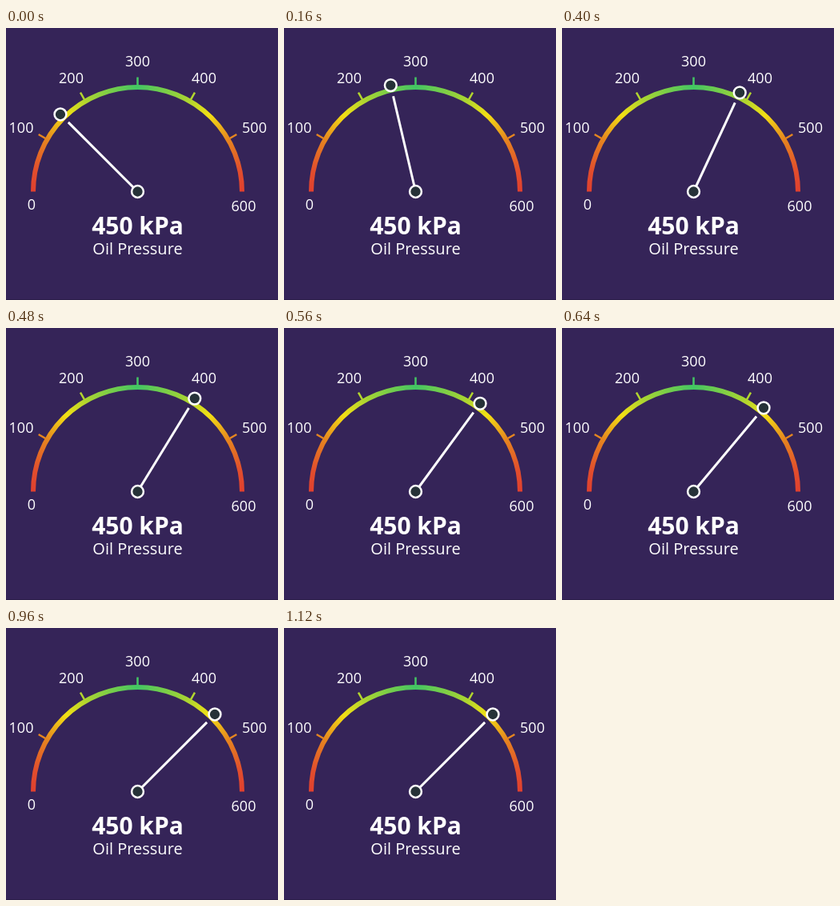
Recreate the animation shown at these times as an HTML page with a canvas. Size 340 px wide and 340 px high, loop 8000 ms.

```html
<!DOCTYPE html>
<html lang="en">
<head>
<meta charset="utf-8">
<title>Oil pressure gauge</title>
<style>
  html, body { margin: 0; height: 100%; overflow: hidden; background: #352458; }
  canvas { display: block; width: 340px; height: 340px; }
</style>
</head>
<body>
<canvas id="gauge" width="340" height="340"></canvas>
<script>
const ctx = document.getElementById('gauge').getContext('2d');
const CX = 164.5, CY = 204.5, LOOP = 8000, STEP = 80;
const FONT = '"Open Sans", "Noto Sans", sans-serif';

// Needle angle from vertical, in degrees, at each step; it then rests at the last.
const SWING = [-45, -34.5, -13.2, 7.6, 7.6, 25, 31.5, 36.2, 39.9, 42.8, 44.8, 45];

const LABELS = [
  ['0', 32, 227], ['100', 19, 131], ['200', 81.5, 69], ['300', 164.5, 48],
  ['400', 247.5, 69], ['500', 310.5, 131], ['600', 297, 229]
];

// Colours by angle above the horizontal, mirrored on both sides.
const scale = ctx.createConicGradient(Math.PI, CX, CY);
const COLOURS = [[0, '#e0402f'], [12, '#e14e2d'], [30, '#e6861f'], [47, '#f2e014'], [62, '#a8d432'], [90, '#42c663']];
for (const [deg, colour] of COLOURS) {
  scale.addColorStop(deg / 360, colour);
  scale.addColorStop((180 - deg) / 360, colour);
}

function polar(deg, r) {
  const a = deg * Math.PI / 180;
  return [CX + r * Math.sin(a), CY - r * Math.cos(a)];
}

function spoke(deg, from, to, width, colour) {
  ctx.beginPath();
  ctx.moveTo(...polar(deg, from));
  ctx.lineTo(...polar(deg, to));
  ctx.lineWidth = width;
  ctx.strokeStyle = colour;
  ctx.stroke();
}

function knob(x, y) {
  ctx.beginPath();
  ctx.arc(x, y, 7.4, 0, 2 * Math.PI);
  ctx.fillStyle = '#263238';
  ctx.fill();
  ctx.lineWidth = 2.5;
  ctx.strokeStyle = '#fff';
  ctx.stroke();
}

function text(str, x, y, font) {
  ctx.font = `${font} ${FONT}`;
  ctx.fillText(str, x, y);
}

function draw(deg) {
  ctx.fillStyle = '#352458';
  ctx.fillRect(0, 0, 340, 340);
  ctx.fillStyle = '#2b1e49';
  ctx.fillRect(0, 339, 340, 1);

  ctx.beginPath();
  ctx.arc(CX, CY, 130.5, Math.PI, 2 * Math.PI);
  ctx.lineWidth = 6;
  ctx.strokeStyle = scale;
  ctx.stroke();
  for (let tick = -60; tick <= 60; tick += 30) spoke(tick, 133, 143, 2.5, scale);

  ctx.fillStyle = '#fff';
  ctx.textAlign = 'center';
  for (const [str, x, y] of LABELS) text(str, x, y, '18px');
  text('450 kPa', 164.5, 258, 'bold 30px');
  text('Oil Pressure', 164.5, 283, '20px');

  spoke(deg, 0, 122.5, 3, '#fff');
  knob(CX, CY);
  knob(...polar(deg, 136.5));
}

function frame() {
  const step = Math.floor(performance.now() % LOOP / STEP);
  draw(SWING[Math.min(step, SWING.length - 1)]);
  requestAnimationFrame(frame);
}
frame();
</script>
</body>
</html>
```
